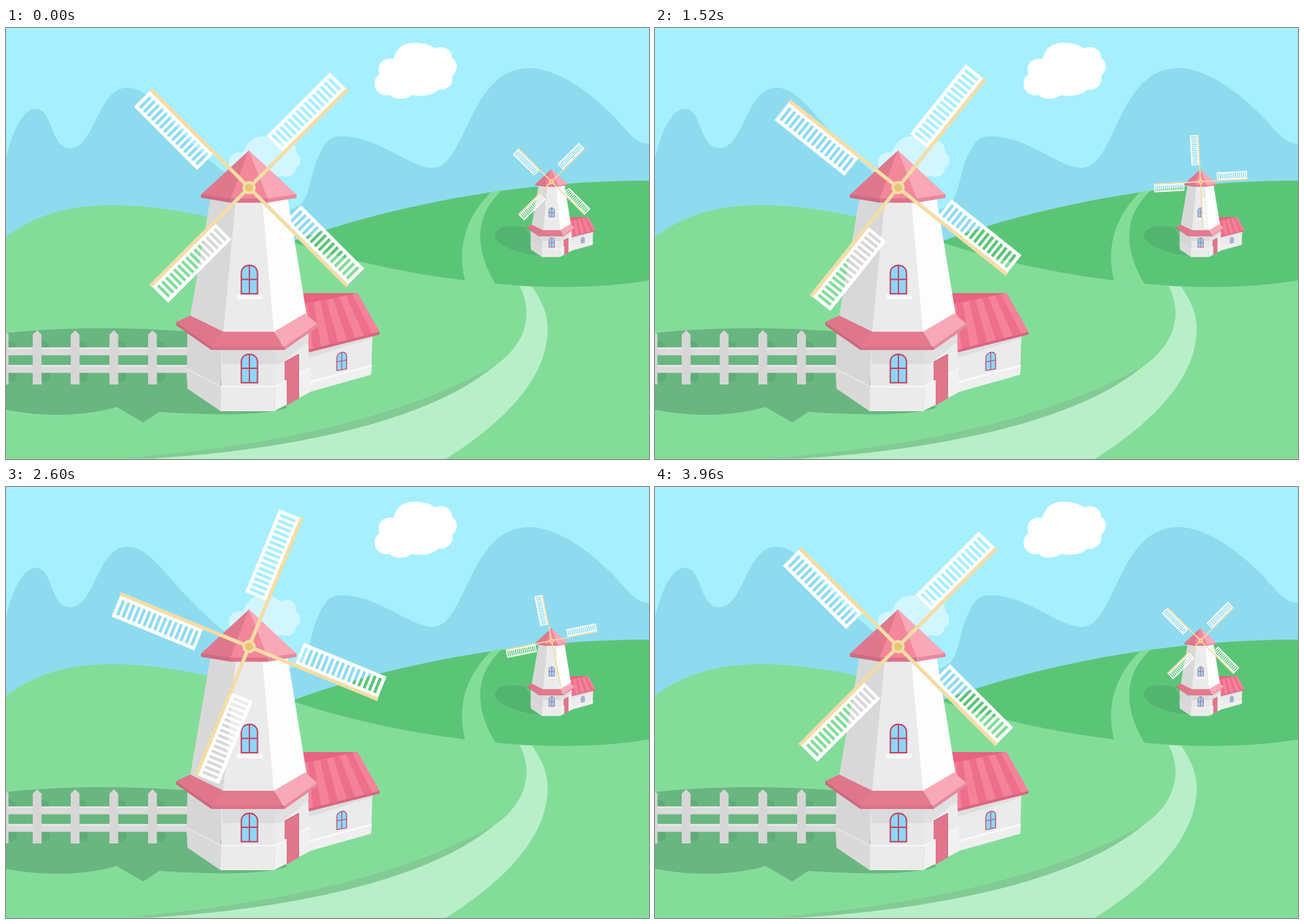
Write an HTML page that moves like this. It is 914 px wide and 613 px high and loops after 4000 ms.

```html
<!DOCTYPE html>
<html lang="en">
<head>
<meta charset="utf-8">
<title>Windmills</title>
<style>
html, body { margin: 0; width: 100%; height: 100%; overflow: hidden; background: #a6efff; }
svg { display: block; width: 100%; height: 100%; }
</style>
</head>
<body>
<svg viewBox="0 0 914 613">
  <defs>
    <g id="pane">
      <path d="M-11.5 20.5V-9C-11.5-16-6-20-0-20S11.5-16 11.5-9V20.5Z" fill="#8fd6fb" stroke="#c0455f" stroke-width="2"/>
      <path d="M0-20V20.5M-11.5 0H11.5" stroke="#c0455f" stroke-width="1.8"/>
    </g>

    <g id="mill">
      <!-- side house -->
      <path d="M426 455L521 432L519 493L430 518Z" fill="#ebebeb"/>
      <path d="M428 461L521 437V441L428 470Z" fill="#dedede"/>
      <path d="M430 504L520 480L519 493L430 518Z" fill="#efefef"/>
      <path d="M430 504L520 480" stroke="#fafafa" stroke-width="2.5"/>
      <use href="#pane" transform="matrix(.61 -.11 0 .61 477.2 473.5)"/>
      <path d="M420 377H500L424 395Z" fill="#e8637f"/>
      <path d="M422 393L500 377L531 432L428 459Z" fill="#f4839a"/>
      <g id="stripes" fill="#ed6f8c"></g>
      <path d="M428 458L531 432V436L428 462Z" fill="#d9667e"/>

      <!-- base -->
      <path d="M258 425L309 450L305 512L257 486Z" fill="#d6d6d6"/>
      <path d="M306 450H385V512H306Z" fill="#e8e8e8"/>
      <path d="M306 450H388V478H308Z" fill="#dbdbdb"/>
      <path d="M384 450L428 425L432 485L383 511Z" fill="#ececec"/>
      <path d="M384 457L430 432V446L390 478H384Z" fill="#e0e0e0"/>
      <path d="M256.500 485L306 510L305 545L258 513Z" fill="#d9d9d9"/>
      <path d="M305.500 510H383L381 545H305Z" fill="#ebebeb"/>
      <path d="M383 510L432 484V518L381 545Z" fill="#f1f1f1"/>
      <path d="M257 485L306 510" stroke="#e4e4e4" stroke-width="2"/>
      <path d="M306 510H383L432 484" stroke="#f8f8f8" stroke-width="2" fill="none"/>
      <path d="M396 475L416 464V527L399 537V501H396Z" fill="#df768b"/>
      <path d="M396 475L416 464V527" stroke="#c95d74" stroke-width="1" fill="none"/>
      <use href="#pane" x="346" y="484"/>

      <!-- tower -->
      <path d="M291 240H328L309 434L261 415Z" fill="#d8d8d8"/>
      <path d="M327 242H365L382 434H308.500Z" fill="#ebebeb"/>
      <path d="M364 242L400 240L428 412L381 434Z" fill="#fdfdfd"/>
      <use href="#pane" x="346" y="357.500"/>
      <path d="M328 379H365V386H328Z" fill="#f8f8f8"/>

      <!-- skirt roof -->
      <path d="M242 418L262 409L309 432L292 453Z" fill="#e0768c"/>
      <path d="M309 432H381L397 457H292L291 453Z" fill="#e37a8f"/>
      <path d="M381 432L425 406L443 421L396 454Z" fill="#f8a8b6"/>
      <path d="M242 418L292 453V458L242 423Z" fill="#cf677d"/>
      <path d="M292 453H396V458H292Z" fill="#dc7188"/>
      <path d="M396 453L443 420V425L396 458Z" fill="#e8899b"/>

      <!-- cap -->
      <path d="M345.500 174L277 237L320 243Z" fill="#df788d"/>
      <path d="M345.500 174L319 243H373Z" fill="#f4879a"/>
      <path d="M345.500 174L413 237L372 243Z" fill="#f8a8b6"/>
      <path d="M277 236.500L320 242.500V248.500L277 241.500Z" fill="#cf6a80"/>
      <path d="M319 242.500H373V248.500H319Z" fill="#dc7188"/>
      <path d="M372 242.500L413 236.500V241.500L372 248.500Z" fill="#e8899b"/>
    </g>

    <g id="arm">
      <path id="sail" fill="#fff" fill-rule="evenodd"/>
      <path d="M-2.600 0V-198H2.600V0Z" fill="#f3dda6"/>
    </g>
    <g id="sails">
      <use href="#arm"/>
      <use href="#arm" transform="rotate(90)"/>
      <use href="#arm" transform="rotate(180)"/>
      <use href="#arm" transform="rotate(270)"/>
      <circle r="9.500" fill="#f3dda6"/>
      <circle r="5.500" fill="#eac373"/>
    </g>
  </defs>

  <rect width="914" height="613" fill="#a6efff"/>
  <path fill="#8edbf0" d="M0 185C9 147 24 115 42 115C68 115 62 171 92 171C126 171 130 85 172 85C212 85 230 141 310 205C345 232 370 258 401 258C437 255 428 208 448 175C457 157 464 154 478 154C528 154 575 199 606 199C655 199 657 57 744 57C784 57 831 92 864 126C882 145 895 165 914 165V400H0Z"/>
  <path fill="#fff" d="M531 66C526 50 536 42 551 44C555 27 566 21 581 21C596 21 605 25 609 29C622 24 635 31 634 43C643 47 643 62 634 68C637 80 628 89 614 88C606 97 585 98 577 95C570 102 552 103 545 95C535 98 523 90 524 79C524 72 527 68 531 66Z"/>
  <path fill="#d2f6ff" d="M321 206C312 190 318 175 337 177C342 161 353 154 365 154C377 154 386 158 390 163C403 155 415 166 412 177C421 182 420 196 412 199C412 211 399 214 392 210L340 225Z"/>

  <!-- hills -->
  <path fill="#5bc577" d="M395 308C500 268 690 217 914 217V400H395Z"/>
  <path fill="#83dd99" d="M690 233C642 280 645 330 653 362L697 366C667 317 663 268 706 230Z"/>
  <path fill="#53b470" d="M695 294C697 283 715 279 738 284L762 324C735 323 694 310 695 294Z"/>
  <path fill="#83dd99" d="M0 297C45 263 95 252 150 252C245 252 330 278 408 305C490 332 570 349 652 359C740 370 830 373 914 359V613H0Z"/>
  <path fill="#b8efc8" d="M730 367C747 398 747 447 690 484C590 542 400 600 165 613H625C720 553 771 490 770 426C769 400 758 384 748 368Z"/>
  <path fill="#82cb93" d="M694 481C570 550 400 592 165 612.500H205C400 601 600 560 694 481Z"/>

  <!-- fence -->
  <path fill="#69b680" d="M0 434C80 425 180 425 275 433L400 540C365 552 290 551 218 546L195 561L157 539C110 553 50 553 0 543Z"/>
  <g id="fence"></g>

  <use href="#mill"/>
  <use href="#mill" transform="translate(775.500 218.500) scale(.337) translate(-345.500 -227)"/>
  <use href="#sails" id="near"/>
  <use href="#sails" id="far"/>
</svg>
<script>
const LOOP = 4000, STEP = 40, LAST = LOOP / STEP - 1;
const $ = id => document.getElementById(id);
const repeat = (n, f) => Array.from({ length: n }, (_, i) => f(i)).join('');

$('sail').setAttribute('d', 'M-34.5-197H-2V-70H-34.5Z' +
  repeat(15, i => `M-29.500 ${-192 + i * 8.1}h22.500v4.300h-22.500Z`));

// roof bands run from the ridge (422,393)-(500,377) to the eave (428,459)-(531,432)
const ridge = s => `${422 + 78 * s} ${393 - 16 * s}`;
const eave = s => `${428 + 103 * s} ${459 - 27 * s}`;
$('stripes').innerHTML = repeat(4, i => {
  const a = 0.08 + i * 0.235, b = a + 0.115;
  return `<path d="M${ridge(a)}L${ridge(b)}L${eave(b)}L${eave(a)}Z"/>`;
});

const posts = [-9, 38, 92, 147, 202];
const rails = [454.5, 479.5];
$('fence').innerHTML =
  posts.map(x => `<path d="M${x + 8} 448l6-4 9 5v6h-14ZM${x + 12} 490h12v9l-6 6-6-5Z" fill="#5fac77"/>`).join('') +
  rails.map(y => `<rect y="${y}" width="262" height="11" fill="#dadada"/><rect y="${y}" width="262" height="2" fill="#eee"/>`).join('') +
  posts.map(x => `<path d="M${x} 507V436l6.300-6 6.200 6V507Z" fill="#d6d6d6"/>`).join('');

function draw(time) {
  const turn = Math.floor((time % LOOP) / STEP + 1e-6) / LAST * 360;
  $('near').setAttribute('transform', `translate(345.5 227) rotate(${45 - 2 * turn})`);
  $('far').setAttribute('transform', `translate(775.5 218.5) scale(.337) rotate(${45 - turn})`);
}

const start = performance.now();
function tick() {
  draw(performance.now() - start);
  requestAnimationFrame(tick);
}
tick();
</script>
</body>
</html>
```
